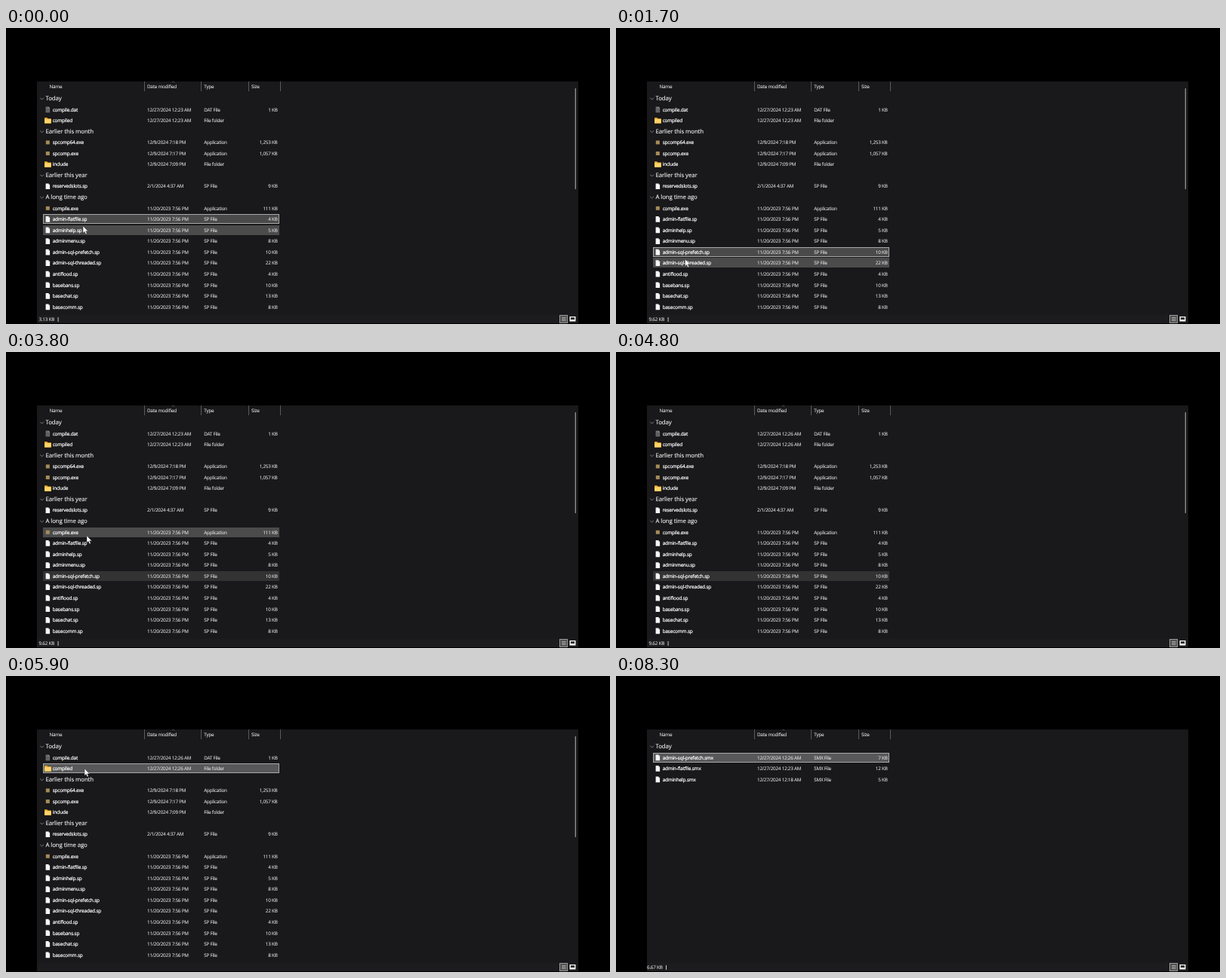
Recreate the animation shown at these times as an HTML page. Size 800x393 px, loop 8.6 s.

```html
<!DOCTYPE html>
<html lang="en">
<head>
<meta charset="utf-8">
<title>File list</title>
<style>
  html, body { margin: 0; width: 100%; height: 100%; overflow: hidden; background: #000; }
  svg { display: block; width: 800px; height: 393px; }
  text {
    font: 6.3px "Open Sans", "Noto Sans", sans-serif; letter-spacing: -.22px;
    fill: #e2e2e2; stroke: #e2e2e2; stroke-width: .1;
    text-rendering: geometricPrecision; white-space: pre;
  }
  .name { font-size: 6.4px; letter-spacing: -.15px; fill: #fff; stroke: #fff; stroke-width: .22; }
  .group { font-size: 7.8px; letter-spacing: -.08px; fill: #fff; stroke: #fff; }
  .size { text-anchor: end; }
</style>
</head>
<body>
<svg id="stage" viewBox="0 0 800 393"></svg>
<script>
const LOOP = 8600, TOP = 93.7, STEP = 14.56;
const stage = document.getElementById("stage");

function el(parent, tag, attrs, text) {
  const node = document.createElementNS("http://www.w3.org/2000/svg", tag);
  for (const k in attrs) node.setAttribute(k, attrs[k]);
  if (text !== undefined) node.textContent = text;
  parent.appendChild(node);
  return node;
}
const set = (node, attrs) => { for (const k in attrs) node.setAttribute(k, attrs[k]); };
const show = (node, on) => node.setAttribute("visibility", on ? "visible" : "hidden");
const rect = (p, x, y, width, height, fill, more) => el(p, "rect", { x, y, width, height, fill, ...more });
const path = (p, d, fill, stroke = "none", w = .8) => el(p, "path", { d, fill, stroke, "stroke-width": w });
const label = (p, x, y, text, cls = "") => el(p, "text", { x, y, class: cls }, text);
const rowY = i => TOP + STEP * i;
const barY = i => Math.floor(rowY(i) - 6.2);

const TYPES = { sp: "SP File", smx: "SMX File", exe: "Application", dat: "DAT File" };
const OLD = "11/20/2023 7:56 PM";
const MAIN = [
  "Today",
  ["compile.dat", "12/27/2024 12:23 AM", "1 KB"],
  ["compiled", "12/27/2024 12:23 AM", ""],
  "Earlier this month",
  ["spcomp64.exe", "12/9/2024 7:18 PM", "1,253 KB"],
  ["spcomp.exe", "12/9/2024 7:17 PM", "1,057 KB"],
  ["include", "12/9/2024 7:09 PM", ""],
  "Earlier this year",
  ["reservedslots.sp", "2/1/2024 4:37 AM", "9 KB"],
  "A long time ago",
  ["compile.exe", OLD, "111 KB"],
  ["admin-flatfile.sp", OLD, "4 KB"],
  ["adminhelp.sp", OLD, "5 KB"],
  ["adminmenu.sp", OLD, "8 KB"],
  ["admin-sql-prefetch.sp", OLD, "10 KB"],
  ["admin-sql-threaded.sp", OLD, "22 KB"],
  ["antiflood.sp", OLD, "4 KB"],
  ["basebans.sp", OLD, "10 KB"],
  ["basechat.sp", OLD, "13 KB"],
  ["basecomm.sp", OLD, "8 KB"]
];
const BUILT = [
  "Today",
  ["admin-sql-prefetch.smx", "12/27/2024 12:26 AM", "7 KB"],
  ["admin-flatfile.smx", "12/27/2024 12:23 AM", "12 KB"],
  ["adminhelp.smx", "12/27/2024 12:18 AM", "5 KB"]
];
const COMPILE = 10, FLAT = 11, PREFETCH = 14;

function icon(p, y, ext) {
  if (ext === "exe") {
    rect(p, 52.8, y - 2.5, 5, 5, "#a58c58");
  } else if (!ext) {
    path(p, `M51 ${y - 3.8}h3.4l1.2 1.2h4.2v6.2h-8.8z`, "#e9a82c");
    rect(p, 51, y - 1.9, 8.8, 5.6, "#ffd368", { rx: .6 });
  } else {
    const dat = ext === "dat";
    path(p, `M52.6 ${y - 3.8}h3.6l1.9 1.9v5.8h-5.5z`, dat ? "#707070" : "#f6f6f6");
    path(p, `M56.2 ${y - 3.8}v1.9h1.9z`, dat ? "#a0a0a0" : "#b8b8b8");
    if (dat) path(p, `M53.4 ${y - .6}h3.9m-3.9 1.5h3.9m-3.9 1.5h3.9`, "none", "#3c3c3c", .5);
  }
}

// Draws a list and returns the date labels by row.
function list(p, rows) {
  return rows.map((row, i) => {
    const y = rowY(i);
    if (typeof row === "string") {
      path(p, `M45.2 ${y - 1}l2.4 2.4 2.4-2.4`, "none", "#a8a8a8", .7);
      label(p, 52.5, y + 2.7, row, "group");
      return null;
    }
    const [name, date, size] = row;
    const ext = name.split(".")[1];
    icon(p, y, ext);
    label(p, 61.7, y + 2.3, name, "name");
    label(p, 262.3, y + 2.3, TYPES[ext] || "File folder");
    label(p, 359.5, y + 2.3, size, "size");
    return label(p, 187, y + 2.3, date);
  });
}

rect(stage, 0, 0, 800, 393, "#000");
rect(stage, 41, 71, 717, 321, "#19181a");
rect(stage, 41, 380.5, 717, 11.5, "#1c1b1d");

const headBar = rect(stage, 42, barY(3), 708, 14, "#2b2b2c");
const selBar = rect(stage, 49.5, 0, 312, 12, "#4d4d4d", { "stroke-width": 1 });
const hoverBar = rect(stage, 49, 0, 313, 13, "#4d4d4d");

[["Name", 57.5], ["Date modified", 187], ["Type", 262.3], ["Size", 325]]
  .forEach(([text, x]) => label(stage, x, 80.2, text));
[183, 258, 321, 363].forEach(x => rect(stage, x, 71, 1, 13, "#5a5a5a"));
path(stage, "M219.8 72.2l1.8-1.2 1.8 1.2", "none", "#777", .6);

const mainView = el(stage, "g", {});
const dates = list(mainView, MAIN);
rect(mainView, 753.7, 80, 1.2, 134, "#a0a0a0", { rx: .6 });
const builtView = el(stage, "g", {});
list(builtView, BUILT);

const status = label(stage, 43.5, 389.2, "");
const bar = rect(stage, 68.6, 384, .9, 6, "#ddd");

// view buttons
rect(stage, 733.5, 381.5, 10, 10, "#4c4c4c", { stroke: "#9c9c9c", "stroke-width": 1 });
path(stage, "M736 384.4h5.6m-5.6 2.1h5.6m-5.6 2.1h5.6", "none", "#e0e0e0", .7);
rect(stage, 746.5, 383, 8, 6.6, "#f2f2f2");
rect(stage, 748, 384.3, 5, 2.8, "#222");

const pointer = path(stage, "M0 0V9.2L2.1 7.3 3.6 10.8 5.2 10.1 3.7 6.8H6.6Z", "#fff", "#222", .4);

// pointer way: time, x, y
const WAY = [
  [0, 102, 263], [200, 100, 266], [700, 86, 296], [1000, 86, 296],
  [1300, 92, 309], [1500, 93, 309], [1900, 90, 305], [2100, 90, 304],
  [3000, 104.5, 243.5], [3500, 104.5, 243.5], [3800, 107, 244], [3900, 107, 244],
  [4200, 116, 121], [4300, 100, 139], [5300, 100, 139], [5400, 104, 123],
  [6100, 104, 123], [6400, 105, 113.5], [7000, 88, 108], [7200, 124, 108],
  [7400, 118, 110], [LOOP, 118, 110]
];
function pointerAt(t) {
  const i = Math.max(1, WAY.findIndex(k => k[0] >= t));
  const [t0, x0, y0] = WAY[i - 1], [t1, x1, y1] = WAY[i];
  const u = (t - t0) / (t1 - t0), e = u * u * (3 - 2 * u);
  return [x0 + (x1 - x0) * e, y0 + (y1 - y0) * e];
}
const within = (t, a, b) => t >= a && t < b;

// selected row and status text from each time on
const PICKS = [[0, FLAT, "3.13 KB"], [900, PREFETCH, "9.62 KB"], [5800, 2, ""], [6000, -1, ""], [7000, 1, "6.67 KB"]];

function draw(time) {
  const t = Math.floor((time % LOOP) / 100) * 100;
  const [x, y] = pointerAt(t);
  const built = t >= 6000;
  const drag = within(t, 2200, 3300);
  const idle = within(t, 3600, 5800);
  const [, sel, info] = PICKS.filter(p => p[0] <= t).pop();

  show(mainView, !built);
  show(builtView, built);
  const stamp = `12/27/2024 12:2${t >= 4800 ? 6 : 3} AM`;
  dates[1].textContent = dates[2].textContent = stamp;

  let hover = Math.round((y - TOP) / STEP);
  if (within(t, 4000, 5200) || hover >= (built ? BUILT : MAIN).length) hover = -1;
  if (drag && hover !== COMPILE) hover = -1;
  const onHead = !built && hover === 3;
  show(headBar, onHead);
  show(hoverBar, hover > 0 && !onHead && hover !== sel);
  set(hoverBar, { y: barY(hover), fill: drag ? "#646464" : "#4b4b4c" });

  show(selBar, sel > 0);
  set(selBar, {
    y: barY(sel) + .5,
    fill: idle ? "#333334" : hover === sel ? "#58585a" : "#4a4a4b",
    stroke: idle ? "#333334" : "#a8a8a8"
  });

  status.textContent = info;
  const left = built ? 41 : 43.5;
  set(status, { x: left });
  set(bar, { x: left + 25.1 });
  show(bar, info !== "");

  show(pointer, !(within(t, 4300, 5200) || within(t, 5400, 5600) || t >= 8300));
  set(pointer, { transform: `translate(${x} ${y})` });
}

const start = performance.now();
function tick() {
  draw(performance.now() - start);
  requestAnimationFrame(tick);
}
draw(0);
requestAnimationFrame(tick);
</script>
</body>
</html>
```
